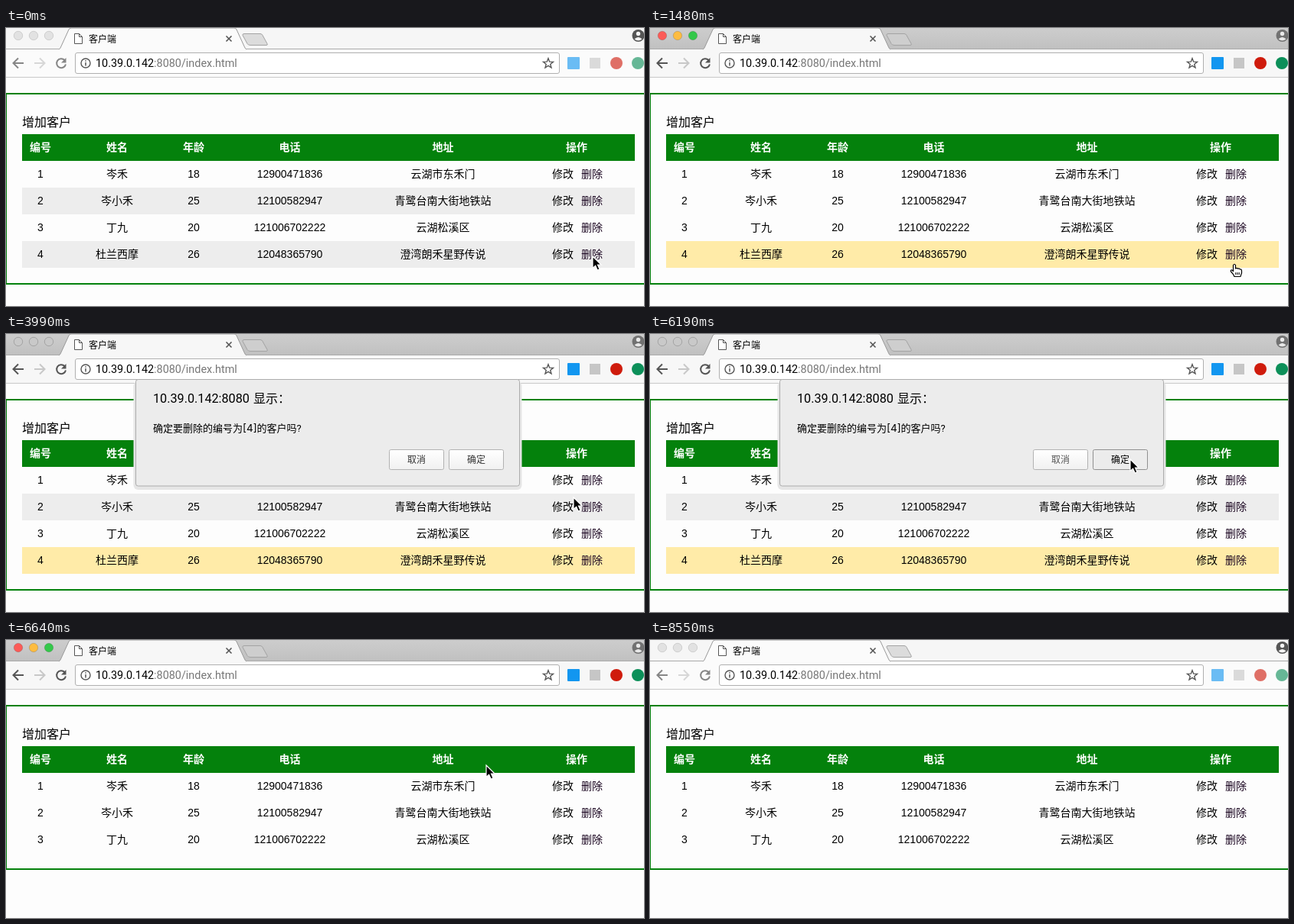
These frames come from a looping animation (833x364 px, 8.65 s). An HTML page:

```html
<!DOCTYPE html>
<html lang="zh-CN">
<head>
<meta charset="utf-8">
<title>客户端</title>
<style>
html, body { margin: 0; width: 100%; height: 100%; overflow: hidden; background: #fdfdfd; }
svg { display: block; width: 833px; height: 364px; }
text { font: 14px "Liberation Sans", "Noto Sans CJK SC", "Noto Sans CJK", sans-serif; fill: #000; }
.ui { font-family: Roboto, "Noto Sans CJK SC", "Noto Sans CJK", sans-serif; }
.mid { text-anchor: middle; }
.head { font-weight: bold; fill: #fff; }
.line { fill: none; stroke: #555; stroke-width: 2; }
</style>
</head>
<body>
<svg viewBox="0 0 833 364">
  <defs>
    <linearGradient id="stripFill" x2="0" y2="1">
      <stop stop-color="#cdcdcd"/><stop offset="1" stop-color="#c0c0c0"/>
    </linearGradient>
    <linearGradient id="btnFill" x2="0" y2="1">
      <stop stop-color="#fff"/><stop offset="1" stop-color="#f1f1f1"/>
    </linearGradient>
  </defs>

  <rect width="833" height="364" fill="#fdfdfd"/>
  <g id="page">
    <rect id="panel" x="0" y="86" width="840" fill="none" stroke="#04810c" stroke-width="2"/>
    <text x="21" y="129" style="font-size:16px">增加客户</text>
    <rect x="21" y="139" width="800" height="35" fill="#04810c"/>
  </g>

  <rect id="strip" width="833" height="28"/>
  <rect id="bar" y="28" width="833" height="36"/>
  <path d="M0 27.5H70M313 27.5H833" stroke="#aaa"/>
  <path d="M0 64.5H833" stroke="#c8c8c8"/>
  <path id="tab" d="M69 28Q70.500 27.500 71.500 25L82 2Q83 0 85 0H298Q300 0 301 2L311.500 25Q312.500 27.500 314 28" stroke="#999"/>
  <path id="plus" d="M311 7.500H332Q334 7.500 335 9.500L341 20.500Q342 22.500 340 22.500H319Q316 22.500 315 20.500L309 9.500Q308.500 7.500 311 7.500Z" stroke="#a3a3a3"/>
  <g id="lights"></g>
  <path d="M89.500 7.500H95.500L99.500 11.500V20.500H89.500ZM95.500 7.500V11.500H99.500" fill="#fff" stroke="#555"/>
  <text class="ui" x="108" y="18.500" style="font-size:12px">客户端</text>
  <path class="line" d="M287.500 10.500L294.500 17.500M294.500 10.500L287.500 17.500" style="stroke-width:1.600"/>
  <g id="user">
    <circle cx="825.500" cy="10" r="8" fill="#555"/>
    <circle cx="825.500" cy="7.500" r="2.700" fill="#f4f4f4"/>
    <path d="M820.500 14.500Q825.500 9.500 830.500 14.500Q825.500 18.500 820.500 14.500" fill="#f4f4f4"/>
  </g>
  <g id="nav">
    <path class="line" d="M23 46H10M16 39.500L9.500 46L16 52.500"/>
    <path class="line" d="M37 46H50M44 39.500L50.500 46L44 52.500" style="stroke:#c8c8c8"/>
    <path class="line" d="M76.500 42A6 6 0 1 0 78 47.500"/>
    <path d="M78.500 39V45.500H72Z" fill="#555"/>
  </g>
  <rect x="90.500" y="32.500" width="632" height="27" rx="2.500" fill="#fff" stroke="#b0b0b0"/>
  <circle class="line" cx="104" cy="46" r="6" style="stroke-width:1.400"/>
  <path d="M104 45V49.500M104 42.300V43.800" stroke="#555" stroke-width="1.500"/>
  <text class="ui" x="117" y="51" style="font-size:14.400px">10.39.0.142<tspan fill="#777">:8080/index.html</tspan></text>
  <path id="star" fill="none" stroke="#555" stroke-width="1.400"/>
  <g id="addons">
    <rect x="733" y="38" width="16" height="16" rx="1" fill="#1296f0"/>
    <rect x="762" y="39" width="14" height="14" fill="#c6c6c6"/>
    <circle cx="797" cy="46" r="8" fill="#cf1b0c"/>
    <circle cx="825" cy="46" r="8" fill="#0c8f59"/>
  </g>

  <g id="dialog">
    <rect x="166.500" y="62" width="507" height="142" rx="6" fill="#e6e6e6"/>
    <rect x="169.500" y="59.500" width="501" height="139.500" rx="3" fill="#ececec" stroke="#acacac"/>
    <text class="ui" x="192" y="90" style="font-size:16.200px">10.39.0.142:8080</text>
    <text class="ui" x="323" y="90" style="font-size:16px">显示：</text>
    <text class="ui" x="192" y="128" style="font-size:13px">确定要删除的编号为<tspan style="font-family:Inter,sans-serif;font-size:13.500px">[4]</tspan>的客户吗?</text>
    <g id="buttons"></g>
  </g>

  <path id="arrow" d="M0 0V15.500L3.600 12.200L6.200 18L9 16.800L6.500 11.200H11.300Z" fill="#000" stroke="#fff" stroke-width="1.200"/>
  <g id="hand">
    <path d="M-1.500 1.500Q0 -1 1.500 1.500V6Q3 4.500 4.500 6.200Q6 5.300 7.300 7Q9.500 6.500 9.500 9V12Q8.500 14 8 16.500H0Q-1 13.500 -4.500 10Q-5.500 7.500 -3 8L-1.500 9.500Z" fill="#fff" stroke="#000" stroke-width="1.200" stroke-linejoin="round"/>
    <path d="M1.800 11V14M4 11V14M6.200 11V14" stroke="#000"/>
  </g>
</svg>
<script>
const LOOP = 8650;
const $ = id => document.getElementById(id);

function add(parent, tag, attrs, text) {
  const el = document.createElementNS('http://www.w3.org/2000/svg', tag);
  for (const k in attrs) el.setAttribute(k, attrs[k]);
  if (text !== undefined) el.textContent = text;
  parent.appendChild(el);
  return el;
}
const show = (el, on) => { el.style.display = on ? '' : 'none'; };

// Table
const centers = [45, 145, 245, 370.5, 570.5];
const heads = ['编号', '姓名', '年龄', '电话', '地址'];
const people = [
  ['1', '岑禾', '18', '12900471836', '云湖市东禾门'],
  ['2', '岑小禾', '25', '12100582947', '青鹭台南大街地铁站'],
  ['3', '丁九', '20', '121006702222', '云湖松溪区'],
  ['4', '杜兰西摩', '26', '12048365790', '澄湾朗禾星野传说']
];
const page = $('page');
[...heads, '操作'].forEach((h, i) =>
  add(page, 'text', { x: [...centers, 745][i], y: 161, class: 'mid head' }, h));

const rows = people.map((cells, r) => {
  const y = 174 + r * 35, g = add(page, 'g', {});
  const bg = add(g, 'rect', { x: 21, y, width: 800, height: 35 });
  cells.forEach((c, i) => add(g, 'text', { x: centers[i], y: y + 22, class: 'mid' }, c));
  add(g, 'text', { x: 713, y: y + 22 }, '修改');
  add(g, 'text', { x: 751, y: y + 22, style: 'fill:#1a0520' }, '删除');
  return { g, bg };
});

// Window controls and star
const lights = [16, 36, 56].map(cx => add($('lights'), 'circle', { cx, cy: 10, r: 5.7 }));
const star = Array.from({ length: 10 }, (_, i) => {
  const a = i * Math.PI / 5 - Math.PI / 2, r = i % 2 ? 2.9 : 6.8;
  return (708 + r * Math.cos(a)).toFixed(2) + ' ' + (46.5 + r * Math.sin(a)).toFixed(2);
});
$('star').setAttribute('d', 'M' + star.join('L') + 'Z');

const buttons = [[500.5, '取消'], [578.5, '确定']].map(([x, s]) => ({
  box: add($('buttons'), 'rect', { x, y: 151.5, width: 71, height: 26, rx: 2 }),
  label: add($('buttons'), 'text', { x: x + 35.5, y: 169, class: 'ui mid', style: 'font-size:12px' }, s)
}));

// Pointer: time, x, y; each pose holds until the next
const path = [
  [0, 766, 299], [300, 767, 300], [450, 766, 302], [590, 765, 305], [740, 764, 309],
  [890, 763, 313], [1030, 763, 316], [1180, 763, 319], [1330, 763, 313], [1480, 763, 309],
  [1630, 763, 305], [1770, 762, 301], [1920, 762, 298], [2060, 762, 297],
  [2660, 761, 298], [2800, 761, 297], [3250, 761, 293],
  [3700, 759, 280], [3850, 752, 248], [3990, 741, 214], [4140, 722, 191], [4290, 701, 179],
  [4430, 681, 172], [4580, 662, 169], [4720, 641, 168], [4870, 632, 166], [5010, 627, 164],
  [7380, 645, 185], [7530, 685, 235], [7680, 730, 295], [7820, 757, 339], [7970, -50, -50]
];
// Window mode and dialog opacity
const modes = [[0, 'idle'], [150, 'active'], [3250, 'modal'], [6640, 'active'], [8550, 'idle']];
const fades = [[0, 0], [3250, .85], [3400, 1], [6490, .4], [6640, 0]];
const at = (table, t) => table.findLast(s => s[0] <= t);

const skins = {
  idle: { strip: '#f6f6f6', bar: '#fbfbfb', plus: '#dcdcdc', lights: ['#e2e2e2', '#e2e2e2', '#e2e2e2'], edge: '#cfcfcf' },
  active: { strip: 'url(#stripFill)', bar: '#f7f7f7', plus: '#cecece', lights: ['#fc5b57', '#fdbc40', '#34c84a'], edge: 'rgba(0,0,0,.15)' },
  modal: { strip: 'url(#stripFill)', bar: '#f7f7f7', plus: '#cecece', lights: ['#c9c9c9', '#c9c9c9', '#c9c9c9'], edge: '#a4a4a4' }
};

function draw(t) {
  const mode = at(modes, t)[1], skin = skins[mode], idle = mode === 'idle';
  const [, x, y] = at(path, t);
  const removed = t >= 6640;

  $('strip').setAttribute('fill', skin.strip);
  $('bar').setAttribute('fill', skin.bar);
  $('tab').setAttribute('fill', skin.bar);
  $('plus').setAttribute('fill', skin.plus);
  lights.forEach((l, i) => {
    l.setAttribute('fill', skin.lights[i]);
    l.setAttribute('stroke', skin.edge);
  });
  $('addons').style.opacity = idle ? .62 : 1;
  $('nav').style.opacity = idle ? .7 : 1;
  $('user').style.opacity = idle ? 1 : .75;

  const overRow = y >= 279 && y < 314;
  const hover = mode === 'modal' || (mode === 'active' && !removed && t >= 300 && overRow);
  const striped = t < 150 || (t >= 3250 && t < 6640);
  rows.forEach(({ bg }, i) => {
    const fill = i === 3 && hover ? '#ffeba8' : i % 2 && striped ? '#ededed' : 'none';
    bg.setAttribute('fill', fill);
  });
  show(rows[3].g, !removed);
  $('panel').setAttribute('height', removed ? 214 : 249);

  // The dialog grows slightly as it fades in
  const fade = at(fades, t)[1], dialog = $('dialog');
  show(dialog, fade > 0);
  dialog.style.opacity = fade;
  dialog.setAttribute('transform', t < 3400 ? 'translate(420 127) scale(.992) translate(-420 -130)' : '');
  const pressed = t >= 6040;
  buttons.forEach(({ box, label }, i) => {
    const down = pressed && i === 1;
    box.setAttribute('fill', down ? '#ececec' : 'url(#btnFill)');
    box.setAttribute('stroke', down ? '#909090' : '#b2b2b2');
    label.style.fill = down ? '#000' : pressed ? '#555' : '#333';
  });

  const link = hover && mode === 'active';
  show($('hand'), link);
  show($('arrow'), !link);
  $(link ? 'hand' : 'arrow').setAttribute('transform', `translate(${x} ${y})`);
}

const start = performance.now();
function tick() {
  draw((performance.now() - start) % LOOP);
  requestAnimationFrame(tick);
}
tick();
</script>
</body>
</html>
```
